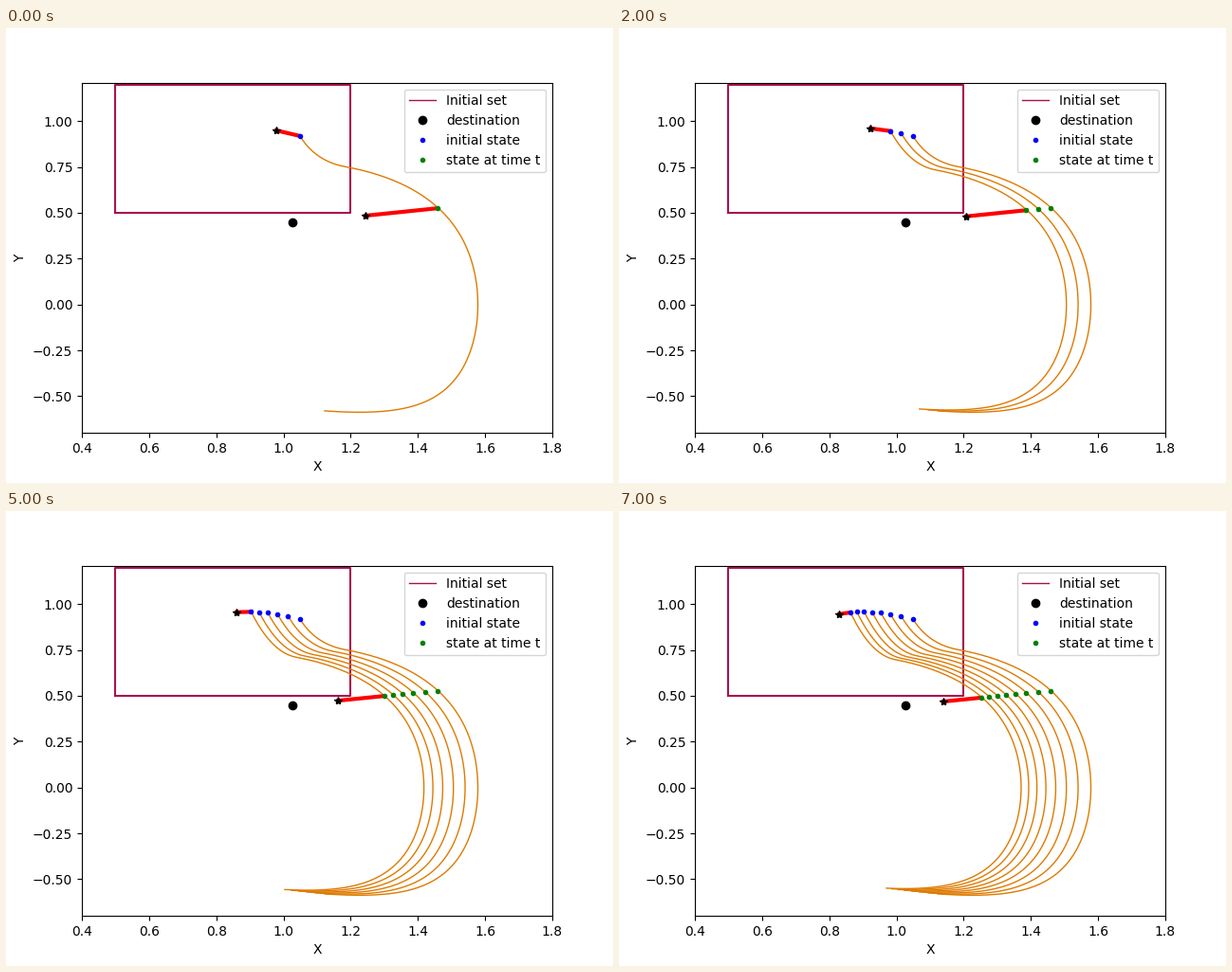
These frames come from a looping animation (640x480 px, 8000 ms). A matplotlib script:

```python
import numpy as np
import matplotlib.pyplot as plt
from matplotlib.animation import FuncAnimation

RUNS = 8
SHRINK = 0.92          # every step is a little shorter than the last
ORANGE, PLUM = "#de7a00", "#a8124f"


def progress(k):
    return (1 - SHRINK**k) / (1 - SHRINK**(RUNS - 1))


def blend(w, first, middle, last):
    """Quadratic through three values at w = 0, 0.5 and 1."""
    a, b, c = (np.asarray(v, float) for v in (first, middle, last))
    return (a * (1 - w) * (1 - 2 * w) + b * 4 * w * (1 - w)
            + c * w * (2 * w - 1))


def branch(x_turn, x_stop, control, sign, n=90):
    """Solve x' = y, y' = u y^2 - x backwards in x from the turning point."""
    xs = x_turn - (x_turn - x_stop) * np.linspace(0, 1, n)**2
    q = np.zeros(n)    # y squared

    def rate(x, q):
        return 2 * (control(np.sqrt(max(q, 0))) * q - x)

    for i in range(n - 1):
        h = xs[i + 1] - xs[i]
        mid = q[i] + rate(xs[i], q[i]) * h / 2
        q[i + 1] = q[i] + rate(xs[i] + h / 2, mid) * h
    return xs, sign * np.sqrt(q)


def entry(start, slope, join, join_slope, n=40):
    """Quadratic curve with given slopes at both ends."""
    (x0, y0), (x1, y1) = start, join
    xc = (y1 - y0 + slope * x0 - join_slope * x1) / (slope - join_slope)
    yc = y0 + slope * (xc - x0)
    t = np.linspace(0, 1, n)
    return tuple((1 - t)**2 * a + 2 * t * (1 - t) * b + t**2 * c
                 for a, b, c in ((x0, xc, x1), (y0, yc, y1)))


def trajectory(w, start):
    x_turn = blend(w, 1.5785, 1.474, 1.371)
    x_join = blend(w, 1.182, 1.0875, 0.9955)
    x_end = blend(w, 1.1225, 1.045, 0.970)
    top_gain = 3.11 - 0.20 * w
    low_gain = 3.56 - 0.18 * w

    ux, uy = branch(x_turn, x_join, lambda y: top_gain - 1.95 * y, 1)
    lx, ly = branch(x_turn, x_end, lambda y: low_gain, -1)
    join_slope = (uy[-1] - uy[-2]) / (ux[-1] - ux[-2])
    ex, ey = entry(start, -3.0 - 0.9 * w, (ux[-1], uy[-1]), join_slope)
    return (np.concatenate([ex, ux[::-1], lx]),
            np.concatenate([ey, uy[::-1], ly]))


fig, ax = plt.subplots(figsize=(6.4, 4.8), dpi=100)
ax.set_xlim(0.4, 1.8)
ax.set_ylim(-0.7, 1.21)
ax.set_xlabel("X")
ax.set_ylabel("Y")

ax.plot([0.5, 1.2, 1.2, 0.5, 0.5], [0.5, 0.5, 1.2, 1.2, 0.5],
        color=PLUM, lw=1.5)
ax.plot(1.0275, 0.448, "ko", ms=6)

runs = []
for k in range(RUNS):
    w = progress(k)
    start = blend(w, (1.049, 0.919), (0.9535, 0.953), (0.863, 0.955))
    state = blend(w, (1.4585, 0.525), (1.355, 0.509), (1.2525, 0.490))
    start_tip = blend(w, (0.979, 0.949), (0.8996, 0.961), (0.830, 0.9455))
    state_tip = blend(w, (1.244, 0.4845), (1.191, 0.4785), (1.1395, 0.469))

    lasting = ax.plot(*trajectory(w, start), color=ORANGE, lw=1, zorder=2)
    lasting += ax.plot(*start, "b.", ms=6, zorder=4)
    lasting += ax.plot(*state, "g.", ms=6, zorder=4)
    passing = []
    for point, tip in ((start, start_tip), (state, state_tip)):
        passing += ax.plot(*zip(point, tip), color="red", lw=3, zorder=3)
        passing += ax.plot(*tip, "k*", ms=6, zorder=4)
    runs.append((lasting, passing))

handles = [ax.plot([], [], style, color=color, lw=1, ms=6, label=label)[0]
           for style, color, label in (("-", PLUM, "Initial set"),
                                       ("o", "black", "destination"),
                                       (".", "blue", "initial state"),
                                       (".", "green", "state at time t"))]
ax.legend(handles=handles, loc="upper right")


def draw(frame):
    for k, (lasting, passing) in enumerate(runs):
        for artist in lasting:
            artist.set_visible(k <= frame)
        for artist in passing:
            artist.set_visible(k == frame)
    return []


anim = FuncAnimation(fig, draw, frames=RUNS, interval=1000,
                     init_func=lambda: draw(0), repeat=True, repeat_delay=0)
plt.show()
```
